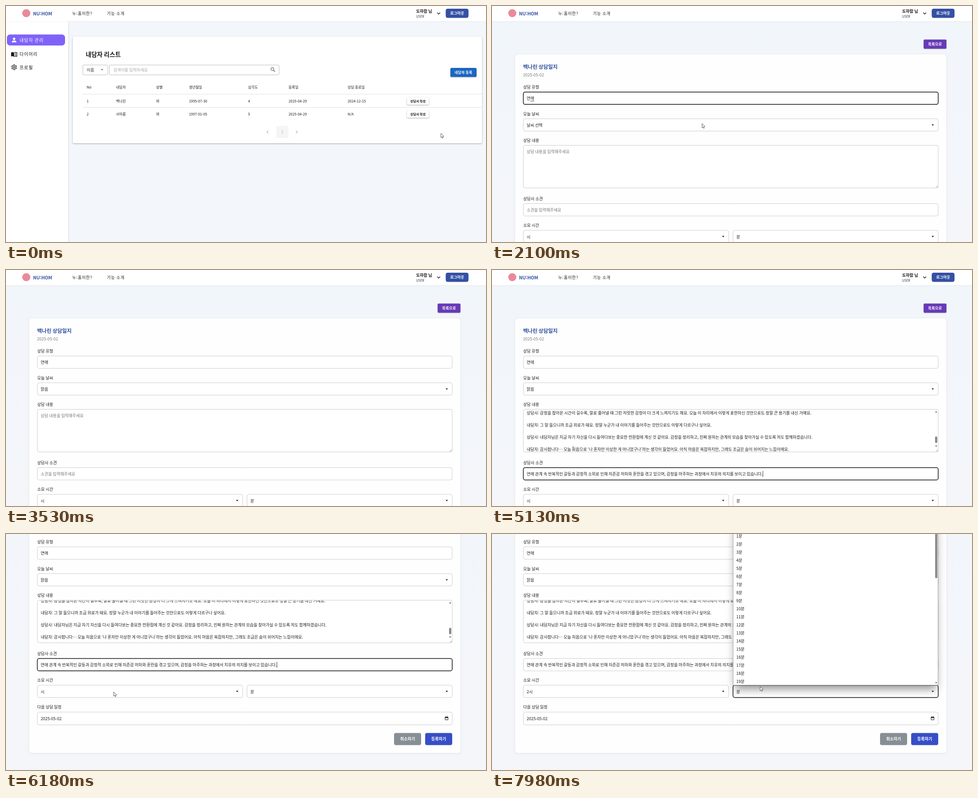
Recreate the animation shown at these times as an HTML page with a canvas. Size 1065 px wide and 526 px high, loop 8000 ms.

```html
<!DOCTYPE html>
<html lang="ko">
<head>
<meta charset="utf-8">
<title>상담일지 작성</title>
<style>
  html, body { margin: 0; width: 100%; height: 100%; overflow: hidden; background: #f3f6fa; }
  canvas { display: block; width: 1065px; height: 526px; }
</style>
</head>
<body>
<canvas id="stage" width="1065" height="526"></canvas>
<script>
const ctx = document.getElementById('stage').getContext('2d');
const LOOP = 8000;
const FONT = '"Noto Sans CJK KR", "Noto Sans CJK", "Noto Sans", sans-serif';
const BODY = 9, SMALL = 7.875;
const NAVY = '#2f4f9f', INK = '#1a1a1a', HINT = '#757575';
const PAGE_SCROLL = 163;

const NOTE = [
  '상담사: 감정을 참아온 시간이 길수록, 말로 풀어낼 때 그런 저릿한 감정이 더 크게 느껴지기도 해요. 오늘 이 자리에서 이렇게 표현하신 것만으로도 정말 큰 용기를 내신 거예요.',
  '내담자: 그 말 들으니까 조금 위로가 돼요. 정말 누군가 내 이야기를 들어주는 것만으로도 이렇게 다르구나 싶어요.',
  '상담사: 내담자님은 지금 자기 자신을 다시 들여다보는 중요한 전환점에 계신 것 같아요. 감정을 정리하고, 진짜 원하는 관계의 모습을 찾아가실 수 있도록 저도 함께하겠습니다.',
  '내담자: 감사합니다… 오늘 처음으로 ‘나 혼자만 이상한 게 아니었구나’라는 생각이 들었어요. 아직 마음은 복잡하지만, 그래도 조금은 숨이 쉬어지는 느낌이에요.'
];
const OPINION = '연애 관계 속 반복적인 갈등과 감정적 소외로 인해 자존감 저하와 혼란을 겪고 있으며, 감정을 마주하는 과정에서 치유의 의지를 보이고 있습니다.';
const WEATHER = ['날씨 선택', '맑음', '흐림', '비', '눈', '안개'];
const HOURS = ['시', ...Array.from({ length: 24 }, (_, i) => `${i + 1}시`)];
const MINUTES = ['분', ...Array.from({ length: 60 }, (_, i) => `${i + 1}분`)];

// [time, x, y, kind]
const POINTER = [
  [0, 965, 284, 'arrow'], [30, 964, 268, 'arrow'], [90, 959, 228, 'arrow'], [290, 959, 228, 'arrow'],
  [480, 914, 212, 'arrow'], [600, 914, 212, 'arrow'], [810, 470, 205, 'beam'], [1539, 470, 205, 'beam'],
  [1540, 468, 258, 'arrow'], [1710, 468, 258, 'arrow'], [1800, 466, 262, 'arrow'], [2300, 466, 262, 'arrow'],
  [2510, 395, 299, 'arrow'], [2739, 395, 299, 'arrow'], [2740, 393, 300, 'arrow'], [2900, 393, 300, 'arrow'],
  [3200, 1050, 330, 'none'], [3730, 300, 350, 'beam'], [3800, 300, 350, 'beam'], [3990, 300, 452, 'beam'],
  [4570, 300, 452, 'beam'], [4750, 260, 508, 'arrow'], [4950, 240, 455, 'beam'], [5100, 180, 398, 'beam'],
  [5560, 180, 398, 'arrow'], [5980, 180, 398, 'arrow'], [6180, 239, 352, 'arrow'], [6300, 239, 352, 'arrow'],
  [6850, 136, 32, 'arrow'], [6900, 136, 32, 'arrow'], [6980, 134, 22, 'arrow'], [7110, 134, 22, 'arrow'],
  [7550, 560, 346, 'arrow'], [7880, 594, 341, 'arrow'], [7979, 594, 341, 'arrow'], [7980, 595, 340, 'arrow'],
  [LOOP, 595, 340, 'arrow']
];

function ease(t, from, to) {
  const p = Math.min(1, Math.max(0, (t - from) / (to - from)));
  return p * p * (3 - 2 * p);
}

// Latest value whose start time has passed
function at(t, steps) {
  let value = steps[0][1];
  for (const [start, v] of steps) if (t >= start) value = v;
  return value;
}

function pointerAt(t) {
  let i = 0;
  while (i < POINTER.length - 2 && t >= POINTER[i + 1][0]) i++;
  const [t0, x0, y0, kind] = POINTER[i], [t1, x1, y1] = POINTER[i + 1];
  const p = ease(t, t0, t1);
  return { x: x0 + (x1 - x0) * p, y: y0 + (y1 - y0) * p, kind };
}

function setFont(size, weight = 400) { ctx.font = `${weight} ${size}px ${FONT}`; }

// y is the optical middle of the line
function text(str, x, y, { size = BODY, color = INK, weight = 400, align = 'left', gap = 0 } = {}) {
  setFont(size, weight);
  ctx.letterSpacing = `${gap}px`;
  ctx.textAlign = align;
  ctx.fillStyle = color;
  ctx.fillText(str, x, y + size * 0.37);
  ctx.letterSpacing = '0px';
}

function rect(x, y, x2, y2, color) {
  ctx.fillStyle = color;
  ctx.fillRect(x, y, x2 - x, y2 - y);
}

function roundPath(x, y, x2, y2, r) {
  ctx.beginPath();
  ctx.roundRect(x, y, x2 - x, y2 - y, r);
}

function box(x, y, x2, y2, r, fill, shadow) {
  ctx.save();
  if (shadow) [ctx.shadowColor, ctx.shadowBlur, ctx.shadowOffsetY] = shadow;
  roundPath(x, y, x2, y2, r);
  ctx.fillStyle = fill;
  ctx.fill();
  ctx.restore();
}

function outline(x, y, x2, y2, r, color, width = 1) {
  roundPath(x, y, x2, y2, r);
  ctx.strokeStyle = color;
  ctx.lineWidth = width;
  ctx.stroke();
}

function line(points, color, width = 1) {
  ctx.beginPath();
  points.forEach(([x, y]) => ctx.lineTo(x, y));
  ctx.strokeStyle = color;
  ctx.lineWidth = width;
  ctx.stroke();
}

function polygon(points, color) {
  ctx.beginPath();
  points.forEach(([x, y]) => ctx.lineTo(x, y));
  ctx.closePath();
  ctx.fillStyle = color;
  ctx.fill();
}

function dot(x, y, r, color) {
  ctx.beginPath();
  ctx.arc(x, y, r, 0, Math.PI * 2);
  ctx.fillStyle = color;
  ctx.fill();
}

function ring(x, y, r, color, width) {
  ctx.beginPath();
  ctx.arc(x, y, r, 0, Math.PI * 2);
  ctx.strokeStyle = color;
  ctx.lineWidth = width;
  ctx.stroke();
}

function triangle(x, y, w, h, color) {
  polygon([[x - w / 2, y - h / 2], [x + w / 2, y - h / 2], [x, y + h / 2]], color);
}

function button(label, x, y, x2, y2, r, fill, size, { color = '#fff', shadow, gap = 0 } = {}) {
  box(x, y, x2, y2, r, fill, shadow);
  text(label, (x + x2) / 2, (y + y2) / 2, { size, color, weight: 700, align: 'center', gap });
}

function header() {
  box(0, 0, 1065, 34, 0, '#fff', ['rgba(0,0,0,.05)', 2, 0.6]);
  dot(45, 16, 9, '#e98a9b');
  text('NU:HOM', 60, 17, { size: 10.1, color: NAVY, weight: 700 });
  text('누:홈이란?', 147, 17, { gap: 0.8 });
  text('기능 소개', 224, 17, { gap: 0.8 });
  text('도하람 님', 910, 11.5, { weight: 700 });
  text('USER', 910, 23.5, { size: 7, color: '#2b2b45' });
  line([[956.8, 14.8], [960, 18], [963.2, 14.8]], '#111', 1.3);
  button('로그아웃', 975.6, 6, 1026.2, 26.5, 4.5, '#3450a4', 8.44);
}

function gear(x, y) {
  ctx.beginPath();
  for (let i = 0; i < 48; i++) {
    const a = i / 48 * Math.PI * 2;
    const r = 4.9 + 0.8 * Math.tanh(3 * Math.cos(6 * a));
    ctx.lineTo(x + r * Math.sin(a), y + r * Math.cos(a));
  }
  ctx.closePath();
  ctx.strokeStyle = INK;
  ctx.lineWidth = 1.2;
  ctx.stroke();
  ring(x, y, 1.9, INK, 1.2);
}

function sidebar() {
  box(0, 34, 138, 530, 0, '#fff', ['rgba(0,0,0,.2)', 3, 0]);
  box(2, 63.5, 131, 88, 7, '#7f63f9');
  dot(18, 73.2, 2.6, '#fff');
  box(13, 77, 23, 81, [4, 4, 0, 0], '#fff');
  polygon([[11.3, 103.5], [14.5, 102.7], [18, 104], [18, 113], [14.5, 111.8], [11.3, 112.6]], INK);
  line([[18, 104], [21, 103], [24.3, 103.8], [24.3, 112.2], [21, 111.6], [18, 112.6]], INK, 1.2);
  for (const y of [105.6, 107.6, 109.6]) line([[19.3, y], [23, y - 0.3]], INK, 0.8);
  gear(18, 136.5);
  const item = { size: 10, weight: 500, gap: 0.9 };
  text('내담자 관리', 30, 76.5, { ...item, color: '#fff' });
  text('다이어리', 30, 107.5, item);
  text('프로필', 30, 137, item);
}

function listPage() {
  const cols = [179, 244, 333, 406, 537, 627, 758];
  const rows = [
    [181, ['No', '내담자', '성별', '생년월일', '심각도', '등록일', '상담 종료일']],
    [212, ['1', '백나린', '여', '1995-07-30', '4', '2025-04-29', '2024-12-15']],
    [241, ['2', '서아름', '여', '1997-01-05', '5', '2025-04-29', 'N/A']]
  ];
  rect(0, 0, 1065, 526, '#f3f6fa');
  sidebar();
  header();
  box(148, 68, 1056, 306, 3, '#fff', ['rgba(0,0,0,.35)', 3, 1]);
  text('내담자 리스트', 177, 108, { size: 13.5, weight: 600 });
  outline(170.5, 131.5, 226, 153.5, 2.5, '#bdbdbd');
  text('이름', 179, 142.5, { color: '#333' });
  triangle(213, 142.3, 6, 3, HINT);
  outline(229.5, 131.5, 606, 153.5, 2.5, '#bdbdbd');
  text('검색어를 입력하세요', 238, 142.5, { color: '#a6a6a6' });
  ring(591, 140.5, 3.2, '#666', 1.2);
  line([[593.3, 142.8], [597, 146.5]], '#666', 1.5);
  button('내담자 등록', 986, 138, 1044, 158, 2.5, '#1a66c1', SMALL,
    { shadow: ['rgba(0,0,0,.35)', 3, 1], gap: 0.3 });
  for (const [y, cells] of rows) {
    cells.forEach((cell, i) => text(cell, cols[i], y, { size: SMALL, weight: y < 200 ? 500 : 400 }));
    if (y > 200) {
      button('상담서 작성', 889.5, y - 8, 938.5, y + 8, 2.5, '#fff', 7,
        { color: INK, shadow: ['rgba(0,0,0,.35)', 3, 1] });
    }
  }
  rect(170, 196, 1056, 197, '#e0e0e0');
  rect(170, 225.5, 1056, 226.5, '#e0e0e0');
  line([[582, 278], [579, 281], [582, 284]], '#b5b5b5', 1.2);
  box(600, 267, 626.5, 294, 2, '#f5f5f5');
  text('1', 613, 281, { color: '#b5b5b5', align: 'center' });
  line([[643.5, 278], [646.5, 281], [643.5, 284]], '#b5b5b5', 1.2);
}

function field(x, y, x2, y2, focused) {
  box(x, y, x2, y2, 4, '#fff');
  outline(x, y, x2, y2, 4, focused ? '#111' : '#ccc', focused ? 1.5 : 1);
}

function select(label, x, y, x2, focused) {
  field(x, y, x2, y + 27.5, focused);
  text(label, x + 7.5, y + 14.2);
  triangle(x2 - 12, y + 14, 5.2, 2.8, '#111');
}

function caret(x, y) { rect(x, y - 6.5, x + 0.9, y + 6.5, '#111'); }

function blink(t, start) { return (t - start) % 1000 < 500; }

function widthOf(str) {
  setFont(BODY);
  return ctx.measureText(str).width;
}

function typeField(t, focused) {
  const typed = at(t, [[0, ''], [1710, 'ㅇ'], [1780, '여'], [1850, '연'], [1940, '연ㅇ'], [2030, '연애']]);
  field(69.5, 191.7, 990, 219.3, focused);
  text(typed, 77, 206);
  if (!focused) return;
  if (!typed) caret(77, 206);
  else if (t < 2300) {
    const end = 77 + widthOf(typed);
    rect(end - 8.2, 211.5, end, 212.3, '#111');
  }
}

function noteField(t, focused) {
  field(69.5, 310.5, 990, 405.5, focused);
  if (t < 3790) {
    text('상담 내용을 입력해주세요', 77, 325, { color: HINT });
    if (focused) caret(77, 325);
  } else {
    const inner = 7 * ease(t, 5380, 5480);
    ctx.save();
    ctx.beginPath();
    ctx.rect(71, 311.5, 918, 93);
    ctx.clip();
    NOTE.forEach((str, i) => text(str, 77, 318.3 + i * 27 - inner));
    if (focused && blink(t, 3790)) caret(77 + widthOf(NOTE[3]), 399);
    ctx.restore();
    const top = 371 + inner / 7;
    box(983, top, 988, top + 14.5, 2.5, '#8b8b8b');
    triangle(985.5, 316, 5, -4, '#8b8b8b');
    triangle(985.5, 393, 5, 4, '#8b8b8b');
  }
  line([[984.5, 405], [989.5, 400]], '#888', 0.7);
  line([[987, 405], [989.5, 402.5]], '#888', 0.7);
}

function opinionField(t, focused) {
  const filled = t >= 5050;
  field(69.5, 440.5, 990, 468, focused);
  text(filled ? OPINION : '소견을 입력해주세요', 77, 454.5, { color: filled ? INK : HINT });
  if (focused && blink(t, filled ? 5050 : 4560)) caret(77 + (filled ? widthOf(OPINION) : 0), 454.5);
}

function dateField() {
  field(69.5, 560, 990, 588.5, false);
  text('2025-05-02', 77, 574.5);
  outline(974.3, 571.2, 980.7, 577.2, 0.5, '#111', 1);
  rect(974, 570.5, 981, 572.8, '#111');
  rect(975.3, 569.8, 976.3, 571, '#111');
  rect(978.8, 569.8, 979.8, 571, '#111');
}

function formPage(t) {
  const focus = at(t, [[0, ''], [1540, 'type'], [2330, 'weather'], [3530, ''], [3730, 'note'],
    [4560, 'opinion'], [6230, 'hour'], [7600, 'minute']]);
  const bg = ctx.createLinearGradient(0, 0, 0, 689);
  bg.addColorStop(0, '#f1f6fa');
  bg.addColorStop(1, '#f5f6fa');
  ctx.save();
  ctx.translate(0, -PAGE_SCROLL * ease(t, 5480, 5980));
  rect(0, 0, 1065, 700, bg);
  header();
  button('목록으로', 957.7, 74.7, 1008.3, 95.2, 2.5, '#673ab7', 8.2,
    { shadow: ['rgba(0,0,0,.25)', 2, 0.8], gap: 0.25 });
  box(51.5, 108, 1008, 651, 6, '#fefefe', ['rgba(0,0,0,.07)', 5, 1]);
  text('백나린 상담일지', 69, 136, { size: 11.5, color: NAVY, weight: 700 });
  text('2025-05-02', 69, 154, { color: '#777' });

  const labels = [['상담 유형', 181], ['오늘 날씨', 240.3], ['상담 내용', 300],
    ['상담사 소견', 429.5], ['소요 시간', 489], ['다음 상담 일정', 548.5]];
  for (const [label, y] of labels) text(label, 69.3, y, { weight: 500 });

  typeField(t, focus === 'type');
  select(t < 2900 ? '날씨 선택' : '맑음', 69.5, 251.3, 990, focus === 'weather');
  noteField(t, focus === 'note');
  opinionField(t, focus === 'opinion');
  select(t < 6990 ? '시' : '2시', 69.5, 500, 525, focus === 'hour');
  select('분', 534.7, 500, 990, focus === 'minute');
  dateField();
  button('취소하기', 861, 606.5, 921, 633.5, 4, '#868e96', BODY);
  button('등록하기', 930, 606.5, 990, 633.5, 4, '#364fc7', BODY);
  ctx.restore();
}

function popup(x, y, x2, options, rows, pointer) {
  const y2 = y + rows * 18;
  const long = options.length > rows;
  const inside = pointer.y >= y && pointer.y < y2 && pointer.x >= x && pointer.x < x2;
  const hover = inside ? Math.floor((pointer.y - y) / 18) : 0;
  box(x + 5, y + 5, x2 - 5, y2 - 2, 2, '#fff', ['rgba(0,0,0,.45)', 20, 10]);
  box(x, y, x2, y2, 1, '#fff');
  outline(x + 0.3, y, x2 - 0.3, y2, 1, '#8a8a8a', 0.8);
  for (let i = 0; i < rows; i++) {
    const top = y + i * 18;
    if (i === hover) rect(x + 0.7, top, x2 - (long ? 8.5 : 0.7), top + 18, '#1967d2');
    text(options[i], x + 7.3, top + 9.3, { color: i === hover ? '#fff' : INK });
  }
  if (!long) return;
  const track = y2 - y - 20;
  box(x2 - 6.8, y + 10, x2 - 1.8, y + 10 + track * rows / options.length, 2.5, '#8b8b8b');
  triangle(x2 - 4.4, y2 - 5, 5, 4, '#8b8b8b');
}

function drawPointer({ x, y, kind }) {
  if (kind === 'none') return;
  if (kind === 'beam') {
    line([[x, y - 4.5], [x, y + 4.5]], '#555', 0.6);
    for (const d of [-4.5, 4.5]) line([[x - 1.8, y + d], [x + 1.8, y + d]], '#555', 0.6);
    return;
  }
  const shape = [[0, 0], [0, 9.4], [2.2, 7.5], [3.6, 10.6], [5.1, 9.9], [3.7, 6.9], [6.5, 6.6]]
    .map(([dx, dy]) => [x + dx, y + dy]);
  polygon(shape, '#fff');
  line([...shape, shape[0]], '#333', 0.8);
}

function draw(t) {
  const pointer = pointerAt(t);
  if (t < 600) listPage();
  else formPage(t);
  if (t >= 2330 && t < 2900) popup(69.7, 279, 990, WEATHER, 6, pointer);
  if (t >= 6250 && t < 6990) popup(69.7, -23, 525, HOURS, 20, pointer);
  if (t >= 7620) popup(534.7, -23, 990, MINUTES, 20, pointer);
  drawPointer(pointer);
}

function tick() {
  draw(performance.now() % LOOP);
  requestAnimationFrame(tick);
}
tick();
</script>
</body>
</html>
```
